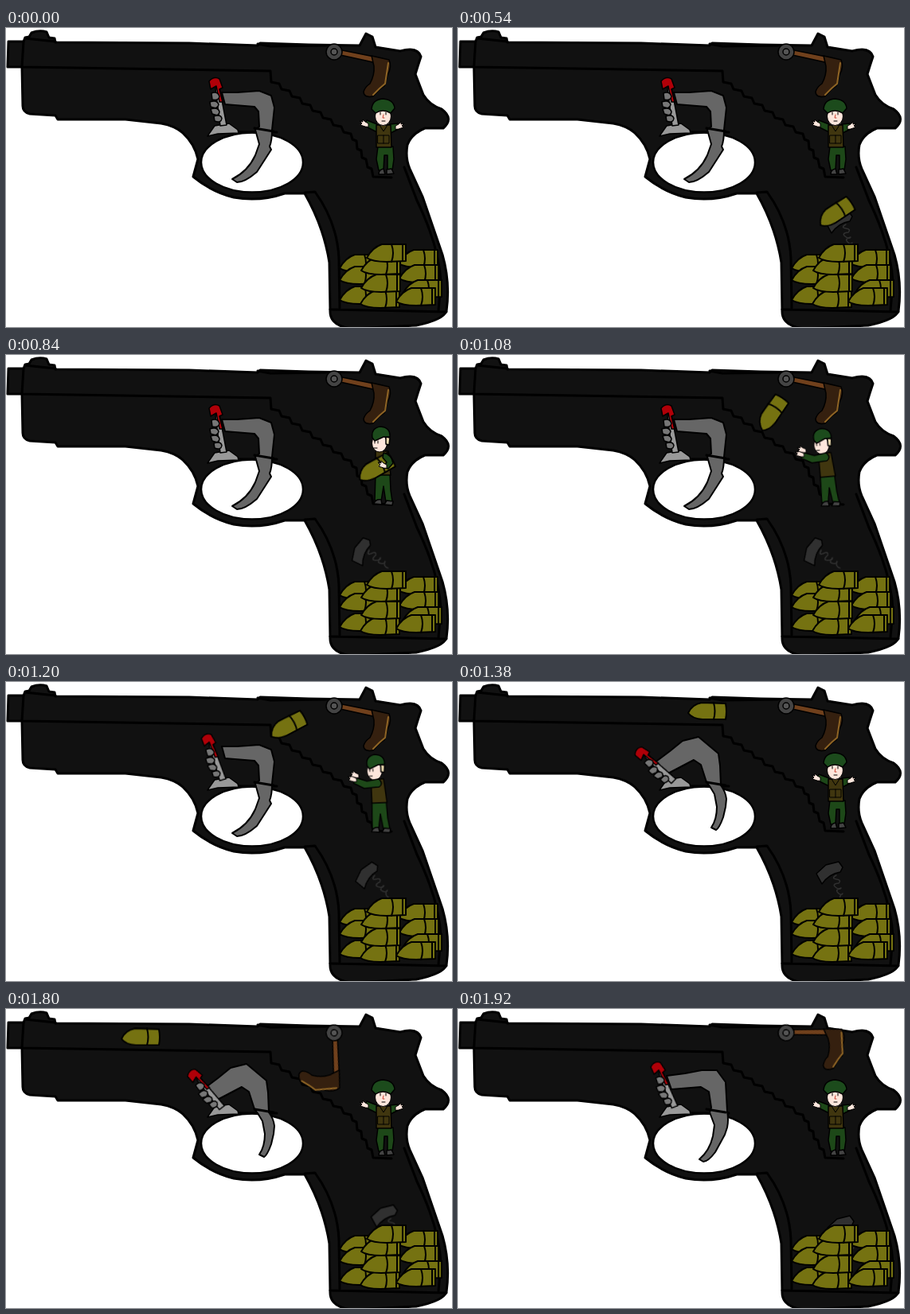
These frames come from a looping animation (560 px wide and 376 px high, 1980 ms). An HTML page without scripts:

```html
<!DOCTYPE html>
<html lang="en">
<head>
<meta charset="utf-8">
<title>Cartoon mechanism</title>
<style>
html, body { margin: 0; width: 100%; height: 100%; overflow: hidden; background: #fff; }
svg { display: block; width: 100vw; height: 100vh; }
path, circle, ellipse { stroke: #000; stroke-width: 1.5; stroke-linejoin: round; stroke-linecap: round; }
.line { fill: none; stroke-width: 3; }
.thin { fill: none; stroke-width: 1; }
.skin { fill: #fde6dc; stroke-width: 1; }
.cloth { fill: #1d4818; }
.vest { fill: #40360f; }
.cap { fill: #1c4b1c; }
.shoe { fill: #444; }
.brass { fill: #757211; stroke-width: 2; }
.band { fill: none; stroke-width: 2; }
.steel { fill: #666; stroke-width: 2; }
.grey { fill: #999; }
.red { fill: #b00008; }

.act { animation: 1980ms step-end infinite; }
.round { animation-name: round; }
.pusher { animation-name: pusher; }
.hammer { animation-name: hammer; transform-origin: 412px 30px; }
.lever { animation-name: lever; transform-origin: 275px 127px; }
.trigger { animation-name: trigger; }
.front { animation-name: front; }
.side { animation-name: side; }
.lean { animation-name: lean; transform-origin: 472px 186px; }
.hold { animation-name: hold; }
.throw { animation-name: throw; }

@keyframes round {
  0% { transform: translate(478px, 283px); visibility: hidden; }
  27.27% { transform: translate(474px, 233px) rotate(-34deg); visibility: visible; animation-timing-function: steps(4); }
  39.39% { transform: translate(464px, 143px) rotate(-30deg); }
  45.45% { transform: translate(461px, 142px) rotate(-32deg); animation-timing-function: steps(3); }
  54.54% { transform: translate(394px, 74px) rotate(-56deg); animation-timing-function: steps(4); }
  66.66% { transform: translate(313px, 37px) rotate(0deg); }
  87.87% { transform: translate(313px, 37px); animation-timing-function: steps(2); }
  93.93% { transform: translate(25px, 34px); }
  96.96%, 100% { transform: translate(25px, 34px); visibility: hidden; }
}
@keyframes pusher {
  0% { transform: translate(480px, 312px); visibility: hidden; }
  27.27% { transform: translate(492px, 276px) rotate(0deg); visibility: visible; animation-timing-function: steps(5); }
  42.42% { transform: translate(477px, 266px) rotate(-36deg); }
  54.54% { transform: translate(477px, 266px) rotate(-36deg); animation-timing-function: steps(5); }
  69.69% { transform: translate(480px, 272px) rotate(0deg); }
  81.81% { transform: translate(480px, 272px) rotate(0deg); animation-timing-function: steps(5); }
  96.96%, 100% { transform: translate(494px, 306px) rotate(0deg); }
}
@keyframes hammer {
  0% { transform: rotate(0deg); }
  69.69% { transform: rotate(0deg); }
  75.75% { transform: rotate(8deg); }
  78.78% { transform: rotate(16deg); }
  81.81% { transform: rotate(23deg); animation-timing-function: steps(2); }
  87.87% { transform: rotate(120deg); animation-timing-function: steps(3); }
  96.96%, 100% { transform: rotate(-12deg); }
}
@keyframes lever {
  0% { transform: rotate(0deg); }
  57.57% { transform: rotate(0deg); animation-timing-function: steps(4); }
  69.69% { transform: rotate(-38deg); }
  87.87% { transform: rotate(-38deg); animation-timing-function: steps(3); }
  96.96%, 100% { transform: rotate(-13deg); }
}
@keyframes trigger {
  0%, 57.57% { d: path("M271 81L290 81L318 79L333 85L337 100L334 128Q334 142 331 149L333 153L315 181Q300 194 290 194L284 190Q304 180 313 160L318 146L313 128L318 124L317 105L312 99L275 96Z"); }
  57.57% { animation-timing-function: steps(4); }
  69.69%, 87.87% { d: path("M246 102L266 87L282 74L302 69L327 90L329 105L330 130Q336 138 337 147L336 157L333 170Q328 184 324 186L318 183Q325 173 325 157L322 141L316 131L312 126L305 104L296 98L258 118Z"); }
  87.87% { animation-timing-function: steps(3); }
  96.96%, 100% { d: path("M262 84L285 81L306 77L325 77L336 92L338 128Q340 140 338 149L335 158L323 180Q314 192 308 192L303 189Q316 178 320 160L322 146L316 130L318 124L315 104L305 98L268 101Z"); }
}
@keyframes front {
  0% { visibility: visible; }
  36.36% { visibility: hidden; }
  69.69%, 100% { visibility: visible; }
}
@keyframes side {
  0% { visibility: hidden; }
  36.36% { visibility: visible; }
  69.69%, 100% { visibility: hidden; }
}
@keyframes hold {
  0% { visibility: hidden; }
  36.36% { visibility: visible; }
  51.51%, 100% { visibility: hidden; }
}
@keyframes throw {
  0% { visibility: hidden; }
  51.51% { visibility: visible; }
  69.69%, 100% { visibility: hidden; }
}
@keyframes lean {
  0% { transform: none; }
  45.45% { transform: translate(0, 0) rotate(0deg); animation-timing-function: steps(3); }
  54.54% { transform: translate(-6px, 2px) rotate(-5deg); animation-timing-function: steps(4); }
  66.66%, 100% { transform: translate(0, 0) rotate(0deg); }
}
</style>
</head>
<body>
<svg viewBox="0 0 560 376">
  <defs>
    <g id="shell">
      <path class="brass" d="M-25 6Q-18-7-6-11L24-11L24 10L0 11Q-18 11-25 6Z"/>
      <path class="band" d="M6-11Q10 0 6 11M20-10V9"/>
    </g>
    <g id="palm"><path class="skin" d="M0 3L-6 1L-4-1L-7-4L-3-3L-3-6L0-3L4-1L4 3Z"/></g>
  </defs>

  <!-- frame -->
  <path fill="#111" style="stroke-width:3" d="M3 17H22L24 12L29 11L32 6Q42 2 51 5L54 12L61 13L62 18L230 19L316 22L319 19L380 21L444 22L452 7L460 11L464 24L495 29Q517 23 521 36Q517 48 514 58L524 84Q532 97 547 102Q563 114 549 126L526 126Q509 133 504 147Q501 163 507 177L523 212L548 285Q558 320 553 356Q549 367 515 374L435 378Q406 375 407 355L406 295Q399 250 375 208L350 208Q318 219 286 213Q258 206 235 187L241 165Q237 146 222 132Q212 123 195 120L150 115H65L62 110L30 108Q21 106 21 98L20 49H2Z"/>
  <path class="line" d="M22 17L20 49L332 54L333 68l10 2 3 7 10 2 3 7 10 2 3 7 10 2 3 7 10 2 3 7 10 2 3 7 10 2 3 7 9 2 2 7 5 2 1 10 5 2 1 9 5 2 2 10 5 2 2 10 23 1M316 20L332 23L402 22M24 13L62 17"/>
  <path class="line" d="M375 207L388 206Q416 245 418 290L419 352M407 354L553 357M500 175L516 217Q544 275 546 320L543 355"/>
  <ellipse cx="309" cy="169" rx="64" ry="37.500" fill="#fff" style="stroke-width:2.500"/>
  <path class="line" d="M280 131L340 131"/>

  <!-- trigger and lever -->
  <path class="act trigger steel"/>
  <path class="line" d="M312 126L336 130"/>
  <path class="grey" d="M253 136L262 123L280 120L291 128L292 132L266 133Z"/>
  <g class="act lever">
    <path class="grey" d="M263 76L268 75L277 122L269 123Z"/>
    <path class="red" d="M255 67Q261 60 268 64L272 75L268 77L272 93L268 93L264 73L257 77Z"/>
    <path fill="#777" d="M258 82q8-3 10 4q-1 6-9 4ZM256 93q9-3 11 3q-1 7-10 3ZM257 102q9-3 11 3q0 7-9 3ZM261 111q9-3 10 3q-1 6-9 3Z"/>
  </g>

  <!-- hammer -->
  <g class="act hammer">
    <path d="M422 28L472 38L470 45L420 34Z" fill="#70401c"/>
    <path d="M459 35L481 40Q485 49 479 59L475 73L469 77L461 86Q449 88 449 80Q451 74 457 70Q463 59 462 48Z" fill="#35200f"/>
    <path class="thin" style="stroke:#8e6425;stroke-width:2" d="M480 44L476 70L469 76L461 84"/>
    <circle cx="412" cy="30" r="10" fill="#444"/>
    <circle cx="412" cy="30" r="4" fill="#555"/>
  </g>

  <!-- pusher and ammunition -->
  <g class="act pusher">
    <path class="thin" style="stroke:#303030;stroke-width:1.500" d="M-5-29q-7 4 0 5t3 5q-9 1-4 5t7 1q-8 2-4 6t6 1q-6 4-2 9"/>
    <path fill="#303030" d="M-30-31L-18-42L-2-46L3-39L0-33Q-14-31-23-18Z"/>
  </g>
  <g>
    <use href="#shell" x="444" y="296"/>
    <use href="#shell" x="518" y="290"/>
    <use href="#shell" x="444" y="311"/>
    <use href="#shell" x="519" y="309"/>
    <use href="#shell" x="444" y="336"/>
    <use href="#shell" x="523" y="328"/>
    <use href="#shell" x="470" y="341"/>
    <use href="#shell" x="471" y="299"/>
    <use href="#shell" x="471" y="321"/>
    <use href="#shell" x="515" y="338"/>
    <use href="#shell" x="478" y="283"/>
  </g>

  <!-- soldier facing out -->
  <g class="act front">
    <path class="cloth" d="M467 149L486 149L487 165L485 179L479 179L479 160L475 160L474 179L468 179L465 165Z"/>
    <path class="shoe" d="M468 184Q468 178 474 177L476 184ZM478 178L484 177L487 183L478 184Z"/>
    <path class="cloth" d="M466 121L453 116L450 123L466 131ZM482 121L492 120L493 127L483 132Z"/>
    <use href="#palm" x="451" y="121"/>
    <use href="#palm" transform="translate(493 124) scale(-1 1)"/>
    <path class="vest" d="M465 122L483 122L484 150L465 150Z"/>
    <path class="thin" d="M467 135H481V145H467ZM474 135V145M469 122L474 130L479 122"/>
    <ellipse class="skin" cx="473.500" cy="111" rx="10" ry="11.500"/>
    <path class="thin" d="M470 106V109M477 106V109M472 117H476"/>
    <path class="thin" style="stroke:#c43" d="M474 109L473 113H475"/>
    <path class="cap" d="M459 102Q460 90 473 89Q487 90 488 101L483 107Q473 101 464 107Z"/>
  </g>

  <!-- soldier in profile -->
  <g class="act lean">
    <g class="act side">
      <path class="cloth" d="M464 149L482 149L483 170L485 184L477 185L474 165L471 184L463 183Z"/>
      <path class="shoe" d="M462 187Q464 181 471 182L472 188ZM475 188L478 183L486 184L485 189Z"/>
      <path class="vest" d="M464 121L480 121L483 151L464 151Z"/>
      <ellipse class="skin" cx="469" cy="111" rx="9.500" ry="11"/>
      <path d="M477 103L482 104L481 113L477 112Z" fill="#ead9ae" stroke="none"/>
      <path class="thin" d="M463 108V111M467 108V111M462 117H466"/>
      <path class="cap" d="M460 104Q458 92 470 90Q483 91 482 103L474 103L463 108Z"/>
    </g>
    <g class="act throw">
      <path class="cloth" d="M474 121Q480 127 474 131L455 132L442 125L445 118L459 123Z"/>
      <use href="#palm" x="442" y="120"/>
      <use href="#palm" x="445" y="115"/>
    </g>
  </g>

  <g class="act round">
    <path class="brass" d="M-24 2Q-19-9-7-11L23-10Q25 0 23 10L-6 10Q-19 9-24 2Z"/>
    <path class="band" d="M8-11Q11 0 8 10"/>
  </g>
  <g class="act hold">
    <path class="cloth" d="M474 123Q484 125 486 136L480 143L473 141L478 135L473 129Z"/>
    <use href="#palm" x="474" y="139"/>
  </g>
</svg>
</body>
</html>
```
